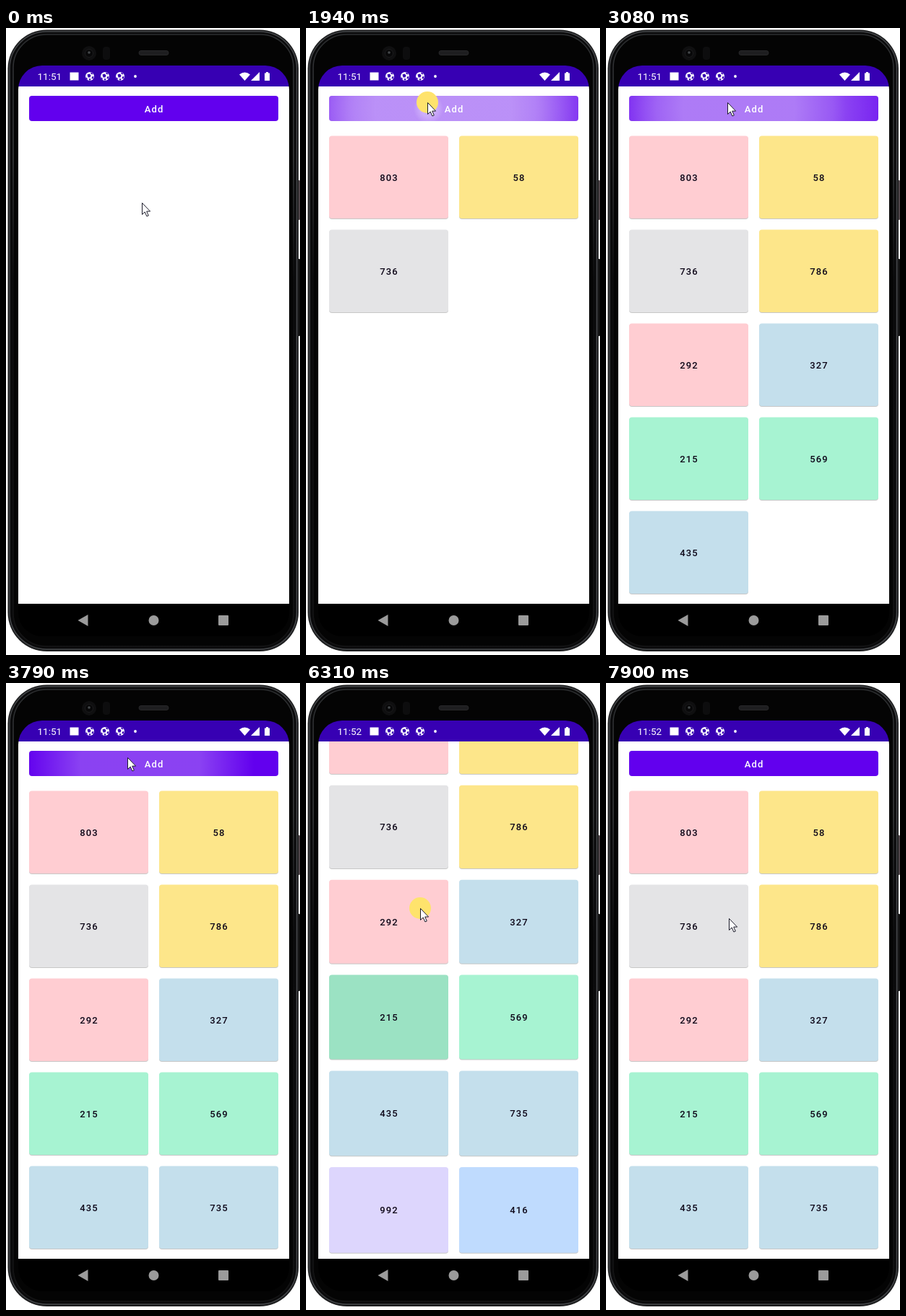
Write an HTML page that moves like this. It is 407 by 869 pixels and loops after 8 s.

```html
<!DOCTYPE html>
<html lang="en">
<head>
<meta charset="utf-8">
<title>Add tiles</title>
<style>
  html, body { margin: 0; width: 100%; height: 100%; overflow: hidden; background: #fff; }
  svg { display: block; width: 100vw; height: 100vh; }
  text { font-family: Roboto, sans-serif; }
  .label { font-size: 13px; font-weight: 500; letter-spacing: 1.15px; text-anchor: middle; }
  .tile rect:first-child { filter: drop-shadow(0 1px .7px rgba(0, 0, 0, .22)); }
</style>
</head>
<body>
<svg viewBox="0 0 407 869">
  <defs>
    <linearGradient id="rim" x2="0" y2="1">
      <stop offset="0" stop-color="#2c2e30"/>
      <stop offset=".2" stop-color="#3a3c3e"/>
      <stop offset=".4" stop-color="#0c0c0d"/>
      <stop offset="1" stop-color="#151516"/>
    </linearGradient>
    <radialGradient id="ripple">
      <stop offset=".52" stop-color="#fff"/>
      <stop offset="1" stop-color="#fff" stop-opacity="0"/>
    </radialGradient>
    <clipPath id="screen"><rect x="17" y="52" width="375" height="791" rx="33"/></clipPath>
    <clipPath id="view"><rect x="17" y="81" width="375" height="717"/></clipPath>
    <clipPath id="buttonShape"><rect x="32" y="94" width="345" height="35" rx="4"/></clipPath>
    <g id="ball">
      <circle r="6" fill="#fff"/>
      <path d="M-3.5-2.5-.5-3.5 1.5-1.5.5 1.5-2.5 1.5ZM1-5.5 4.5-4 3.5-2.5 1.5-3.5ZM3 .5 5.5 0 4.5 3.5 2.5 3ZM-5.5 1-3.5 2.5-3 5-5 3.5ZM-1 3 1.5 3.5 1 5.5-1 5.5Z" fill="#3700b3"/>
    </g>
  </defs>

  <rect x="403" y="211" width="4" height="55" rx="1" fill="#51474b"/>
  <rect x="403" y="320" width="4" height="107" rx="1" fill="#111"/>
  <rect x="2.5" y="2.5" width="402.5" height="861.5" rx="54" fill="#1c1d1e"/>
  <rect x="5" y="5" width="397.5" height="856" rx="51" fill="#0a0a0b" stroke="#434548" stroke-width="1.5"/>
  <rect x="10" y="9" width="388" height="848" rx="46" fill="#040404" stroke="url(#rim)" stroke-width="1.5"/>
  <circle cx="115" cy="35" r="10" fill="#0f0f10"/>
  <circle cx="115" cy="35" r="5.5" fill="#080809" stroke="#1c1c1e"/>
  <circle cx="115" cy="34" r="1.8" fill="#45494c"/>
  <rect x="134" y="26" width="10" height="18" rx="4" fill="#0d0d0e"/>
  <rect x="184" y="31.5" width="41" height="6" rx="3" fill="#1e1e20" stroke="#28282a"/>

  <g clip-path="url(#screen)">
    <rect x="17" y="52" width="375" height="791"/>
    <rect x="17" y="81" width="375" height="717" fill="#fff"/>
    <g clip-path="url(#view)">
      <g id="button">
        <rect x="32" y="94" width="345" height="35" rx="4" fill="#6200ee"/>
        <g id="ripples" clip-path="url(#buttonShape)"></g>
        <text class="label" x="205.2" y="117" fill="#fff">Add</text>
      </g>
      <g id="tiles"></g>
    </g>
    <rect x="17" y="52" width="375" height="29" fill="#3700b3"/>
    <g fill="#fff">
      <text id="clock" x="43.5" y="72" font-size="13.5"></text>
      <rect x="88.5" y="61.5" width="12" height="11"/>
      <use href="#ball" x="116" y="67"/>
      <use href="#ball" x="137" y="67"/>
      <use href="#ball" x="158" y="67"/>
      <circle cx="179" cy="67" r="1.9"/>
      <path d="M323 64.5Q330.5 58.5 338 64.5L330.5 73ZM339 73 351 61V73ZM358 62.5H360V61H363V62.5H365V73H358Z"/>
    </g>
    <g fill="#9b9b9b">
      <path d="M99.5 821 113.5 813V829Z"/>
      <circle cx="204.5" cy="821" r="7"/>
      <rect x="294" y="814" width="14" height="14" rx="1"/>
    </g>
  </g>

  <g id="pointer">
    <circle id="disc" r="15" fill="#fee36c"/>
    <path d="M.5.5V16.5L4.2 13 6.9 19 9.3 18 6.7 12.1H11.6Z" fill="#fff" stroke="#1c1c2b"/>
  </g>
</svg>
<script>
const LOOP = 8000, FIRST = 440, STEP = 114.77;
const TOP = 81, BOTTOM = 798, HEIGHT = BOTTOM - TOP, MAX_SCROLL = 124;
const PINK = '#ffcdd2', YELLOW = '#fde68a', GREY = '#e4e4e6', BLUE = '#c4dfec', GREEN = '#a7f3d2';
const TILES = [
  [803, PINK], [58, YELLOW], [736, GREY], [786, YELLOW], [292, PINK], [327, BLUE],
  [215, GREEN], [569, GREEN], [435, BLUE], [735, BLUE], [992, '#ddd6fd'], [416, '#bfdbfe']
];

// All times below are in animation steps.
const CLICKS = [5, 9.2, 10.3, 11.6, 12.9, 14.1, 15.7, 16.9, 20.5, 22, 27.9, 33];
const TILE_DELAY = 1.9;
const POINTER = [
  [-1, 188, 242], [3, 168, 103], [40, 168, 103], [45, 158, 651], [46, 158, 651],
  [51, 158, 312], [53, 158, 262], [54, 158, 262], [56, 240, 330], [59, 246, 540],
  [60, 246, 540], [62, 258, 174], [65, 170, 326]
];
const PULL = [[46, 0], [51, 339], [53, 389], [55, MAX_SCROLL], [56, MAX_SCROLL], [59, -86], [61, 0]];
const HOLDS = [{ from: 46, to: 53, tile: 6 }, { from: 56, to: 59, tile: 5 }];

const $ = id => document.getElementById(id);
const clamp = (v, lo, hi) => Math.min(hi, Math.max(lo, v));

function add(parent, name, attrs) {
  const node = document.createElementNS('http://www.w3.org/2000/svg', name);
  set(node, attrs);
  return parent.appendChild(node);
}

function set(node, attrs) {
  for (const key in attrs) node.setAttribute(key, attrs[key]);
}

// Linear interpolation in a list of [time, ...values].
function track(keys, n) {
  if (n <= keys[0][0]) return keys[0].slice(1);
  const next = keys.findIndex(key => key[0] > n);
  if (next < 0) return keys[keys.length - 1].slice(1);
  const a = keys[next - 1], b = keys[next], k = (n - a[0]) / (b[0] - a[0]);
  return a.slice(1).map((v, i) => v + (b[i + 1] - v) * k);
}

const ripples = CLICKS.map(() => add($('ripples'), 'circle', { cy: 112, fill: 'url(#ripple)' }));

const tiles = TILES.map(([number, fill], i) => {
  const x = i % 2 ? 212 : 32;
  const group = add($('tiles'), 'g', { class: 'tile' });
  const box = { x, width: 165, rx: 4 };
  const face = add(group, 'rect', { ...box, fill });
  const shade = add(group, 'rect', { ...box, fill: '#000' });
  const label = add(group, 'text', { class: 'label', x: x + 83, fill: '#0d0618' });
  label.textContent = number;
  return { group, face, shade, label, y: 149.5 + 130 * Math.floor(i / 2) };
});

// Scrolls a height and stretches it away from the edge that is pulled past.
function place(y, scroll, stretch) {
  const bend = d => 1 - (1 - clamp(d / HEIGHT, 0, 1)) ** 2;
  y -= scroll;
  return stretch > 0 ? y - stretch * bend(BOTTOM - y) : y - stretch * bend(y - TOP);
}

function draw(n) {
  const [x, y] = track(POINTER, n);
  const hold = HOLDS.find(h => n >= h.from && n <= h.to);
  const clicking = CLICKS.some(c => n >= c && n < c + 1);
  set($('pointer'), { transform: `translate(${Math.round(x)} ${Math.round(y)})` });
  set($('disc'), { visibility: hold || clicking ? 'visible' : 'hidden' });
  $('clock').textContent = n < 43 ? '11:51' : '11:52';

  const [pull] = track(PULL, n);
  const scroll = clamp(pull, 0, MAX_SCROLL);
  const stretch = (pull - scroll) * 14 / 215;
  set($('button'), { transform: `translate(0 ${place(94, scroll, stretch) - 94})` });

  // Each ripple slows as it grows and drifts towards the button's middle.
  ripples.forEach((ripple, i) => {
    const age = Math.max(0, n - CLICKS[i]);
    set(ripple, {
      cx: 168 + 16 * Math.min(age, 1.5),
      r: 270 * (1 - Math.exp(-age / 1.25)),
      opacity: .26 * clamp((7 - age) / 4, 0, 1)
    });
  });

  tiles.forEach((tile, i) => {
    const top = place(tile.y, scroll, stretch);
    const height = place(tile.y + 114.5, scroll, stretch) - top;
    set(tile.group, { visibility: n >= CLICKS[i] + TILE_DELAY ? 'visible' : 'hidden' });
    set(tile.face, { y: top, height });
    set(tile.shade, { y: top, height, opacity: hold && hold.tile === i ? .07 : 0 });
    set(tile.label, { y: Math.round(top + height / 2 + 5) });
  });
}

function tick(now) {
  const t = now % LOOP;
  draw(Math.max(-1, Math.floor((t - FIRST + 12) / STEP)));
  requestAnimationFrame(tick);
}
draw(-1);
requestAnimationFrame(tick);
</script>
</body>
</html>
```
